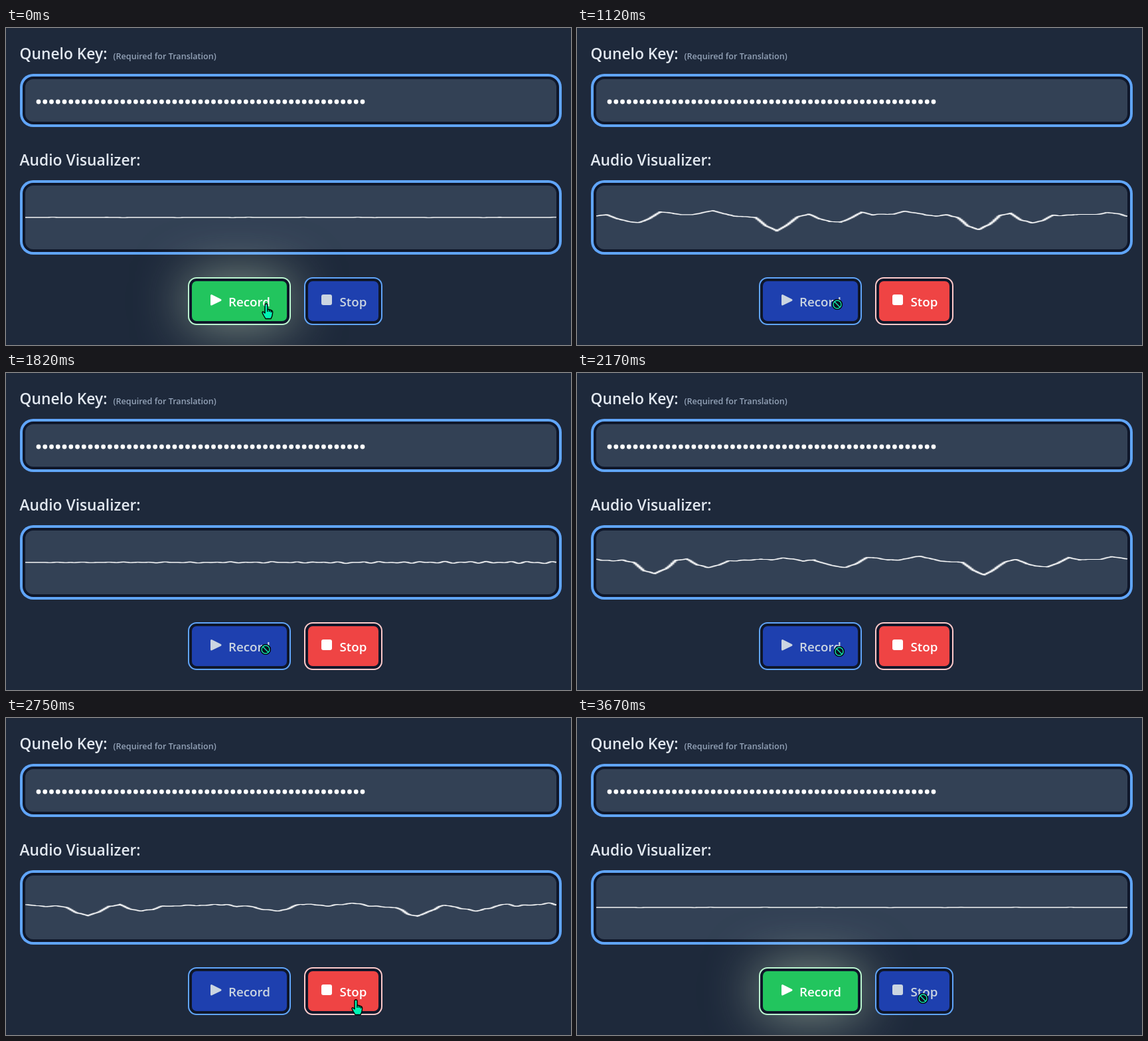
Recreate the animation shown at these times as an HTML page with a canvas. Size 851 by 477 pixels, loop 3740 ms.

```html
<!DOCTYPE html>
<html lang="en">
<head>
<meta charset="utf-8">
<title>Audio recorder</title>
<style>
  html, body { margin: 0; width: 100%; height: 100%; overflow: hidden; background: #1e293b; }
  .panel, .button, canvas, svg { position: absolute; }
  .panel {
    left: 29px; width: 800px; border-radius: 12px; background: #334155;
    box-shadow: 0 0 0 4px #0f172a, 0 0 0 8px #60a5fa;
  }
  canvas { left: 29px; top: 237px; width: 800px; height: 96px; }
  svg { left: 0; top: 0; }
  .button {
    top: 381px; height: 60px; border-radius: 7px; background: #1e40af;
    box-shadow: 0 0 0 4px #0f172a, 0 0 0 6px #60a5fa;
  }
  #record.active {
    background: #22c55e;
    box-shadow: 0 0 0 4px #0f172a, 0 0 0 6px #bbf7d0, 0 0 80px 6px #d2eac899;
  }
  #stop.active {
    background: #ef4444;
    box-shadow: 0 0 0 4px #0f172a, 0 0 0 6px #fecaca;
  }
  text { font: 600 22.8px "Open Sans", "Noto Sans", sans-serif; fill: #e2e8f0; }
  .hint { font-size: 12.6px; fill: #94a3b8; }
  .caption { fill: #cbd5e1; stroke: #cbd5e1; }
  .caption.active { fill: #fff; stroke: #fff; }
  .caption text { font-size: 18.8px; fill: inherit; stroke: none; }
  #cursor g { display: none; }
</style>
</head>
<body>
<div class="panel" style="top:77px;height:64px"></div>
<div class="panel" style="top:237px;height:96px"></div>
<canvas id="wave" width="300" height="150"></canvas>
<div class="button" id="record" style="left:280px;width:143px"></div>
<div class="button" id="stop" style="left:455px;width:106px"></div>

<svg width="851" height="477">
  <text x="20.5" y="47">Qunelo Key:</text>
  <text class="hint" x="161.5" y="47">(Required for Translation)</text>
  <path d="M49 111H538" stroke="#fff" stroke-width="6.8" stroke-linecap="round" stroke-dasharray="0 9.76"/>
  <text x="20.5" y="207">Audio Visualizer:</text>

  <g class="caption" id="recordCaption">
    <path d="M309.5 402.5L323 409.3 309.5 416z" stroke-width="3" stroke-linejoin="round"/>
    <text x="335" y="419">Record</text>
  </g>
  <g class="caption" id="stopCaption">
    <rect x="475" y="401" width="16" height="16" rx="3" stroke="none"/>
    <text x="502.5" y="419">Stop</text>
  </g>

  <g id="cursor" stroke="#000" stroke-width="1.4" stroke-linejoin="round">
    <g id="hand">
      <path fill="#00f5b4" d="M-2 1a2 2 0 0 1 4 0v6l5 1.5q3 1 2.6 4l-.8 5-1.8 4H-1l-3-5-2-4q0-2.5 2.5-1L-2 13z"/>
      <path fill="none" d="M2 7v4M4.8 8v3M7.4 9v3"/>
    </g>
    <g id="blocked" fill="none">
      <circle r="6.6" fill="#0b1220" stroke-width="3"/>
      <path d="M6 0A6 6 0 1 1-6 0 6 6 0 1 1 6 0M-4.2-4.2L4.2 4.2" stroke="#12e8b4"/>
    </g>
    <g id="arrow"><path fill="#00f5b4" d="M0 0V16L4 12.5 7 19 9.5 18 6.8 11.5H12z"/></g>
  </g>
</svg>

<script>
const LOOP = 3740, STEP = 70, BYTE = 75 / 128;
const $ = id => document.getElementById(id);
const ctx = $("wave").getContext("2d");

// One spoken sound, as evenly spaced heights in stage pixels.
const VOICE = [
  -2, -4, 2, 6, 8, 2, -8, -7, -4, -4, -7, -10, -6, -2, -1, 0, 13,
  20, 11, -1, -5, 2, 6, 7, 1, -8, -4, -5, -5, -9, -7, -4, -2, -4,
  0, 13, 18, 11, -3, -6, 4, 8, 5, -3, -3, -4, -5, -4, -7, -6];

const VOLUME = [
  [0, 0], [770, 0], [980, 1.5], [1120, 1], [1400, 1.3], [1680, .5], [1820, .08], [2030, 1.6],
  [2240, .6], [2450, .12], [2520, .05], [2600, 1.1], [2750, .6], [2870, 1.2], [3010, 0], [LOOP, 0]];

const POINTER = [
  [0, 392, 416], [1120, 392, 416], [1400, 391, 416], [1820, 391, 416], [2170, 395, 419],
  [2450, 396, 419], [2520, 402, 419], [2730, 527, 425], [3080, 527, 425],
  [3360, 525, 424], [3570, 521, 422], [LOOP, 521, 422]];

function track(keys, t, column = 1) {
  const i = Math.max(1, keys.findIndex(key => key[0] >= t));
  const a = keys[i - 1], b = keys[i];
  return a[column] + (b[column] - a[column]) * (t - a[0]) / (b[0] - a[0]);
}

function voiceAt(position) {
  const n = VOICE.length, p = ((position % n) + n) % n, i = Math.floor(p);
  return VOICE[i] + (VOICE[(i + 1) % n] - VOICE[i]) * (p - i);
}

function drawWave(t) {
  const step = t / STEP, shift = (step - 16) * 18.7;
  const volume = track(VOLUME, t), rising = track(VOLUME, t + STEP) > volume;
  const voiceGain = volume * Math.min(1, volume * 3);
  const rippleGain = 28 * volume * Math.exp(-4 * volume);
  ctx.clearRect(0, 0, 300, 150);
  ctx.beginPath();
  for (let x = 0; x <= 300; x += .5) {
    const tilt = 1 - .8 * (rising ? 300 - x : x) / 300;
    const ripple = (Math.sin(x * .52 + step) + Math.sin(x * .83 + step * 3)) / 2;
    const hiss = .6 * Math.sin(x * .09 + step * 5) * Math.sin(x * .31 + step * 2);
    const height = voiceGain * voiceAt(x / 6 + shift) + rippleGain * tilt * ripple;
    ctx.lineTo(x, 75 + BYTE * Math.round(height / .375 + hiss));
  }
  ctx.lineWidth = 2;
  ctx.strokeStyle = "#fff";
  ctx.stroke();
}

function setActive(id, active) {
  $(id).classList.toggle("active", active);
  $(id + "Caption").classList.toggle("active", active);
}

function drawPointer(t, recording) {
  const x = track(POINTER, t), y = track(POINTER, t, 2);
  const overGap = x > 429 && x < 449;
  const enabled = x < 440 ? !recording : recording;
  const shape = overGap ? "arrow" : enabled ? "hand" : "blocked";
  for (const id of ["hand", "blocked", "arrow"]) $(id).style.display = id === shape ? "inline" : "none";
  $("cursor").setAttribute("transform", `translate(${x} ${y})`);
}

function render(now) {
  const t = Math.floor(now % LOOP / STEP) * STEP;
  const recording = t >= 280 && t < 3220;
  setActive("record", !recording);
  setActive("stop", recording);
  drawWave(t);
  drawPointer(t, recording);
}

const start = performance.now();
function tick() {
  render(performance.now() - start);
  requestAnimationFrame(tick);
}
tick();
</script>
</body>
</html>
```
